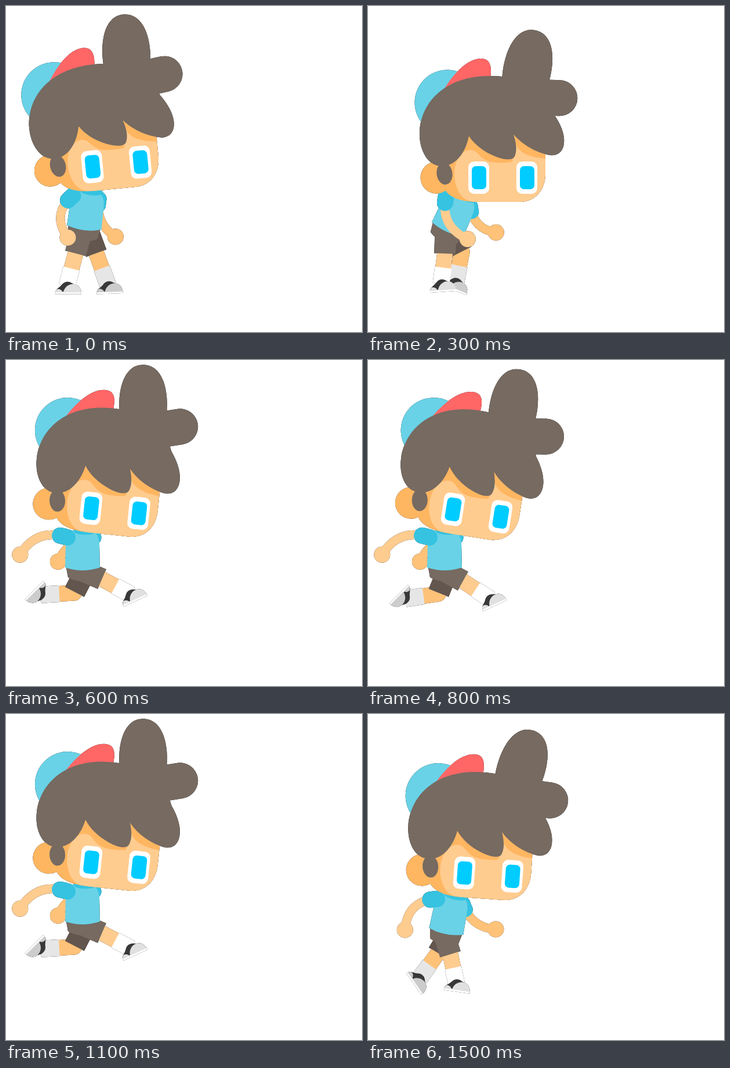
Write an HTML page that moves like this. It is 614 by 564 pixels and loops after 1600 ms.

```html
<!DOCTYPE html>
<html lang="en">
<head>
<meta charset="utf-8">
<title>Jumping boy</title>
<style>
  html, body { margin: 0; width: 100%; height: 100%; overflow: hidden; background: #fff; }
  svg { display: block; width: 614px; height: 564px; }
  #boy { filter: drop-shadow(0 0 .6px #000); }
  .line { fill: none; stroke-linejoin: round; }
</style>
</head>
<body>
<svg viewBox="0 0 614 564">
  <defs>
    <!-- Head, with the left eye as its origin -->
    <g id="head">
      <circle cx="-54" cy="-130" r="56.5" fill="#69d2e7"/>
      <path fill="#f66" d="M-66-143C-45-180-20-206 4-206C20-206 24-192 19-165Z"/>
      <circle cx="-73" r="27.5" fill="#ffb661"/>
      <path fill="#ffb661" d="M-66-90L-58 21C-50 35-30 42 0 42H70C97 42 115 22 115-8V-90Z"/>
      <path fill="#ffcc8f" d="M-14 41C-51 32-51-46-14-48C2-47 0-28 30-26Q52-25 58-28L62-62C68-42 90-35 115-33V-8C115 22 97 42 70 42H0Z"/>
      <rect x="-18" y="-28" width="36" height="56" rx="10" fill="#fff"/>
      <rect x="65" y="-28" width="36" height="56" rx="10" fill="#fff"/>
      <rect x="-12" y="-20" width="25" height="40" rx="7" fill="#0cf"/>
      <rect x="71" y="-20" width="25" height="40" rx="7" fill="#0cf"/>
      <path fill="#766a61" d="M-102-75C-102-130-58-176 19-176C70-176 110-160 128-112C141-94 149-75 147-59C145-42 132-36 118-40C95-45 72-60 60-75C64-62 67-48 62-37C58-28 40-32 28-37C8-45-8-58-17-72C-22-45-38-24-56-21C-85-14-102-45-102-75Z"/>
      <ellipse cx="-59" cy="-7" rx="13.5" ry="19" transform="rotate(-8 -59 -7)" fill="#766a61"/>
    </g>
    <g id="tufts" fill="#766a61">
      <path d="M38-150C27-195 34-257 74-257S122-195 112-150Z"/>
      <path d="M76-140L139-151" stroke="#766a61" stroke-width="62" stroke-linecap="round"/>
    </g>
    <!-- Torso, with the middle of the hem as its origin -->
    <g id="torso">
      <path fill="#766a61" d="M-29-4H29L25 18Q0 32-25 18Z"/>
      <path fill="#69d2e7" d="M-30 1Q0 11 30 1L29-40Q28-62 10-64H-15Q-28-58-29-40Z"/>
      <ellipse cx="5" cy="-62" rx="20" ry="6.5" fill="#35c3e1"/>
    </g>
    <!-- Shoe, with the back of the sole as its origin -->
    <g id="shoe">
      <path fill="#383838" d="M1-3C0-9 8-11 12-17Q17-23 25-21L37-15L22-3Z"/>
      <path fill="#fff" d="M0 0V-4H45V0Z"/>
      <path d="M14-3C17-21 43-24 45-3ZM1-3Q0-7 4-9Q11-9 13-3Z"/>
    </g>
  </defs>
  <g id="boy"></g>
</svg>
<script>
// head: x, y, tilt, hair sway. body: x, y, lean. Limbs: angle from straight down
// (forward is positive) and reach; legs add the sole angle and knee bend.
const pose = (head, body, nearLeg, farLeg, nearArm, farArm) => ({ head, body, nearLeg, farLeg, nearArm, farArm });
const stand = pose([149, 278, -5.5, 3], [135, 382, 7], [-15, 101, 0, 0], [20, 103, -2, 0], [-7, 73], [23, 71]);
const crouch = pose([191, 297, 0, 12], [138, 385, 24], [-5, 91, -4, 2], [5, 88, 23, 15], [26, 84], [44, 63]);
const float = pose([146.5, 256.5, 6, -5], [132, 358, 0], [64, 97, -25, 2], [-61, 89, 135, 25], [-70, 87], [-56, 75]);
const land = pose([159, 271, 18, -14], [133, 370, 0], [40, 96, -27, 2], [53, 94, -5, 2], [-39, 65], [-43, 34]);
const stride = pose([166, 275, 4, 14], [135, 375, 11], [14, 89, 8, 2], [-34, 93, 55, 2], [-46, 77], [52, 71]);
const keys = [[0, stand], [300, crouch], [600, float], [1100, float], [1300, land], [1500, stride], [1600, stand]];

const loop = 1600, step = 100, rad = Math.PI / 180;
const boy = document.getElementById('boy');

function poseAt(t) {
  const i = keys.findIndex(([end]) => end > t);
  const [[start, from], [end, to]] = [keys[i - 1], keys[i]];
  const linear = (t - start) / (end - start);
  const u = to === float ? 1 - (1 - linear) ** 2 : linear; // the leap slows as it rises
  const mixed = {};
  for (const part in from) mixed[part] = from[part].map((v, j) => v + (to[part][j] - v) * u);
  if (from === float && to === float) sag(mixed, Math.sin(Math.PI * linear));
  return mixed;
}

// In mid-air the head nods and the legs drop a little
function sag({ head, nearLeg, farLeg }, amount) {
  head[1] += 2 * amount;
  head[2] += 3 * amount;
  head[3] += 7 * amount;
  nearLeg[0] *= 1 - .09 * amount;
  farLeg[0] *= 1 - .09 * amount;
}

const use = (id, x, y, turn, extra = '') =>
  `<use href="#${id}" transform="translate(${x} ${y}) rotate(${turn}) ${extra}"/>`;

const line = (d, colour, width, dash = '1', cap = 'butt') =>
  `<path class="line" pathLength="1" d="${d}" stroke="${colour}" stroke-width="${width}" stroke-dasharray="${dash}" stroke-linecap="${cap}"/>`;

// Point at a share of a limb's reach, pushed forward by out
function along([x, y], angle, distance, out = 0) {
  const s = Math.sin(angle * rad), c = Math.cos(angle * rad);
  return [x + s * distance + c * out, y + c * distance - s * out];
}

function leg(hip, [angle, reach, turn, bend], shorts, skin, sock, toe) {
  const ankle = along(hip, angle, reach);
  const d = `M${hip}L${along(hip, angle, reach * .42, bend)}L${ankle}`;
  return line(d, skin, 27) + line(d, sock, 29, '0 .69 .31 1') + line(d, shorts, 37, '.42 1') +
    `<g fill="${toe}">${use('shoe', ...ankle, turn, 'translate(-20 14)')}</g>`;
}

function arm(shoulder, [angle, reach], bow, skin, sleeve) {
  const hand = along(shoulder, angle, reach);
  const d = `M${shoulder}Q${along(shoulder, angle, reach / 2, -bow)} ${hand}`;
  return line(d, skin, 15) + `<circle cx="${hand[0]}" cy="${hand[1]}" r="14" fill="${skin}"/>` +
    line(d, '#35c3e1', sleeve, '.14 2', 'round');
}

function draw(t) {
  const { head: [x, y, tilt, sway], body, nearLeg, farLeg, nearArm, farArm } = poseAt(t);
  const [bx, by, lean] = body;
  const hip = dx => [bx + dx, by + 5];
  const shoulder = dx => along([bx, by], -lean, -51, dx);
  boy.innerHTML =
    arm(shoulder(20), farArm, 24, '#ffc279', 25) +
    leg(hip(6), farLeg, '#62564f', '#ffc279', '#e6e6e6', '#ccc') +
    leg(hip(-4), nearLeg, '#766a61', '#ffcc8f', '#fff', '#e0e0e0') +
    use('torso', ...body) +
    arm(shoulder(-26), nearArm, 34, '#ffcc8f', 28) +
    use('head', x, y, tilt) +
    use('tufts', x, y, tilt, `rotate(${sway} 76 -143)`);
}

const start = performance.now();
let shown = -1;
function tick() {
  const t = Math.floor((performance.now() - start) % loop / step) * step;
  if (t !== shown) draw(shown = t);
  requestAnimationFrame(tick);
}
tick();
</script>
</body>
</html>
```
